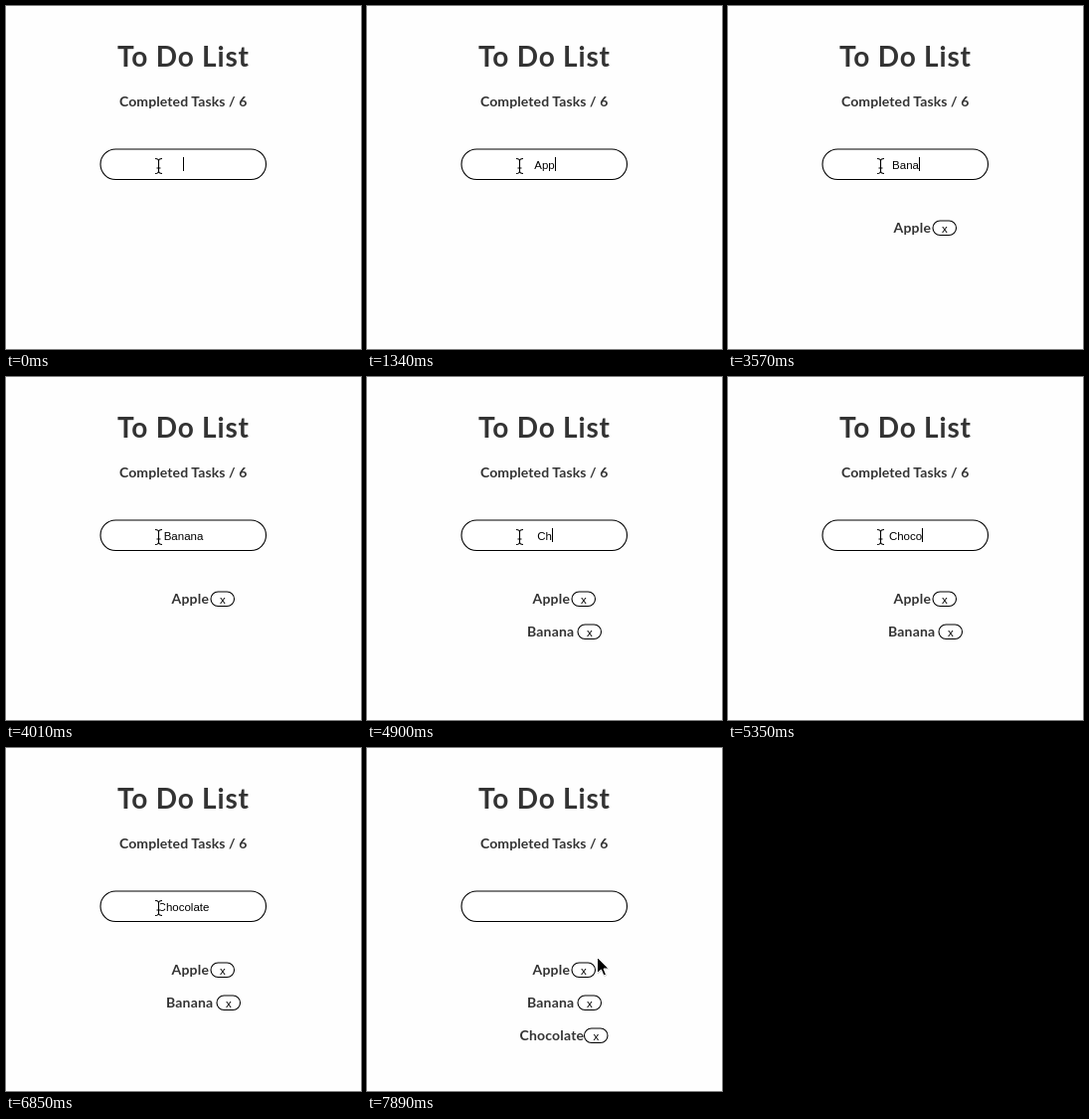
An HTML page that plays this animation: 357x345 px, repeating every 8000 ms.

```html
<!DOCTYPE html>
<html lang="en">
<head>
<meta charset="utf-8">
<title>To Do List</title>
<style>
  html, body { margin: 0; width: 100%; height: 100%; overflow: hidden; background: #fefefe; }
  svg { display: block; width: 357px; height: 345px; }
  .label { font: 700 14px Lato, sans-serif; fill: #333; }
  .title { font-size: 28px; letter-spacing: .8px; }
  .ui { font: 11.5px "Liberation Sans", Arial, sans-serif; fill: #000; text-anchor: middle; }
  .pill { fill: #fff; stroke: #000; stroke-width: 1.1; }
  .beam { fill: none; stroke: #000; stroke-width: 1.1; }
  .halo { stroke: #fff; stroke-width: 3; }
</style>
</head>
<body>
<svg viewBox="0 0 357 345">
  <rect width="357" height="345" fill="#fefefe"/>
  <text class="label title" x="112" y="61">To Do List</text>
  <text class="label" x="114" y="101" letter-spacing=".1">Completed Tasks / 6</text>
  <rect class="pill" x="95" y="144" width="166.5" height="30.5" rx="15.25"/>
  <text id="typed" class="ui" x="178.5" y="163.5"></text>
  <rect id="caret" y="152" width="1" height="14"/>
  <g id="list"></g>
  <g id="beam">
    <path class="beam halo" d="M-3.5-7.5Q0-7.5 0-5Q0-7.5 3.5-7.5M0-5V5M-3.5 7.5Q0 7.5 0 5Q0 7.5 3.5 7.5M-2 2H2"/>
    <path class="beam" d="M-3.5-7.5Q0-7.5 0-5Q0-7.5 3.5-7.5M0-5V5M-3.5 7.5Q0 7.5 0 5Q0 7.5 3.5 7.5M-2 2H2"/>
  </g>
  <g id="arrow">
    <path d="M0 0V16L4 12.5 6.5 18.5 9 17.5 6.5 11.5H11.5Z" transform="translate(.6 1)" fill="#000" opacity=".2"/>
    <path d="M0 0V16L4 12.5 6.5 18.5 9 17.5 6.5 11.5H11.5Z" stroke="#fff" stroke-width="1"/>
  </g>
</svg>
<script>
const LOOP = 8000;
const $ = id => document.getElementById(id);
const [typed, caret, list, beam, arrow] = ['typed', 'caret', 'list', 'beam', 'arrow'].map($);

// [time, typed text]; a trailing bar means the caret is lit
const keys = [
  [0, '|'], [150, ''], [600, '|'],
  [750, 'A|'], [1200, 'Ap|'], [1340, 'App|'], [1640, 'Appl|'], [1790, 'Apple|'],
  [2080, '|'], [2380, ''],
  [2980, 'B'], [3280, 'Ba|'], [3430, 'Ban|'], [3570, 'Bana|'], [3720, 'Banan|'],
  [3870, 'Banana|'], [4010, 'Banana'],
  [4310, '|'], [4610, ''],
  [4900, 'Ch|'], [5050, 'Cho|'], [5200, 'Choc|'], [5350, 'Choco|'], [5650, 'Choco'],
  [5800, 'Chocol|'], [6100, 'Chocola|'], [6400, 'Chocola'], [6550, 'Chocolat|'],
  [6700, 'Chocolate|'], [6850, 'Chocolate'],
  [7140, '|'], [7440, '']
];

// [time, shape, x, y]
const pointer = [
  [0, beam, 153.5, 161],
  [7590, beam, 176.5, 167],
  [7740, arrow, 222, 198],
  [7890, arrow, 231.5, 210.5]
];

// [time, name, text x, button x]
const tasks = [
  [2080, 'Apple', 166.5, 206],
  [4310, 'Banana', 161, 212],
  [7140, 'Chocolate', 153.5, 218.5]
];

function add(parent, tag, attrs, text = '') {
  const el = document.createElementNS('http://www.w3.org/2000/svg', tag);
  for (const k in attrs) el.setAttribute(k, attrs[k]);
  el.textContent = text;
  return parent.appendChild(el);
}

const rows = tasks.map(([, name, x, bx], i) => {
  const row = add(list, 'g', { transform: `translate(0 ${223 + 33 * i})` });
  add(row, 'text', { class: 'label', x, y: 5, 'letter-spacing': .2 }, name);
  add(row, 'rect', { class: 'pill', x: bx, y: -7, width: 23.5, height: 14.5, rx: 7.25 });
  add(row, 'text', { class: 'ui', x: bx + 11.75, y: 4.5 }, 'x');
  return row;
});

const show = (el, on) => el.setAttribute('visibility', on ? 'visible' : 'hidden');
const latest = (steps, t) => steps.findLast(s => s[0] <= t);

function draw(t) {
  const state = latest(keys, t)[1];
  const text = state.replace('|', '');
  typed.textContent = text;
  const width = text ? typed.getComputedTextLength() : 0;
  caret.setAttribute('x', Math.round(178.4 + width / 2));
  show(caret, state.endsWith('|'));

  rows.forEach((row, i) => show(row, t >= tasks[i][0]));

  const [, shape, x, y] = latest(pointer, t);
  show(beam, shape === beam);
  show(arrow, shape === arrow);
  shape.setAttribute('transform', `translate(${x} ${y})`);
}

const start = performance.now();
function tick() {
  draw((performance.now() - start) % LOOP);
  requestAnimationFrame(tick);
}
tick();
</script>
</body>
</html>
```
